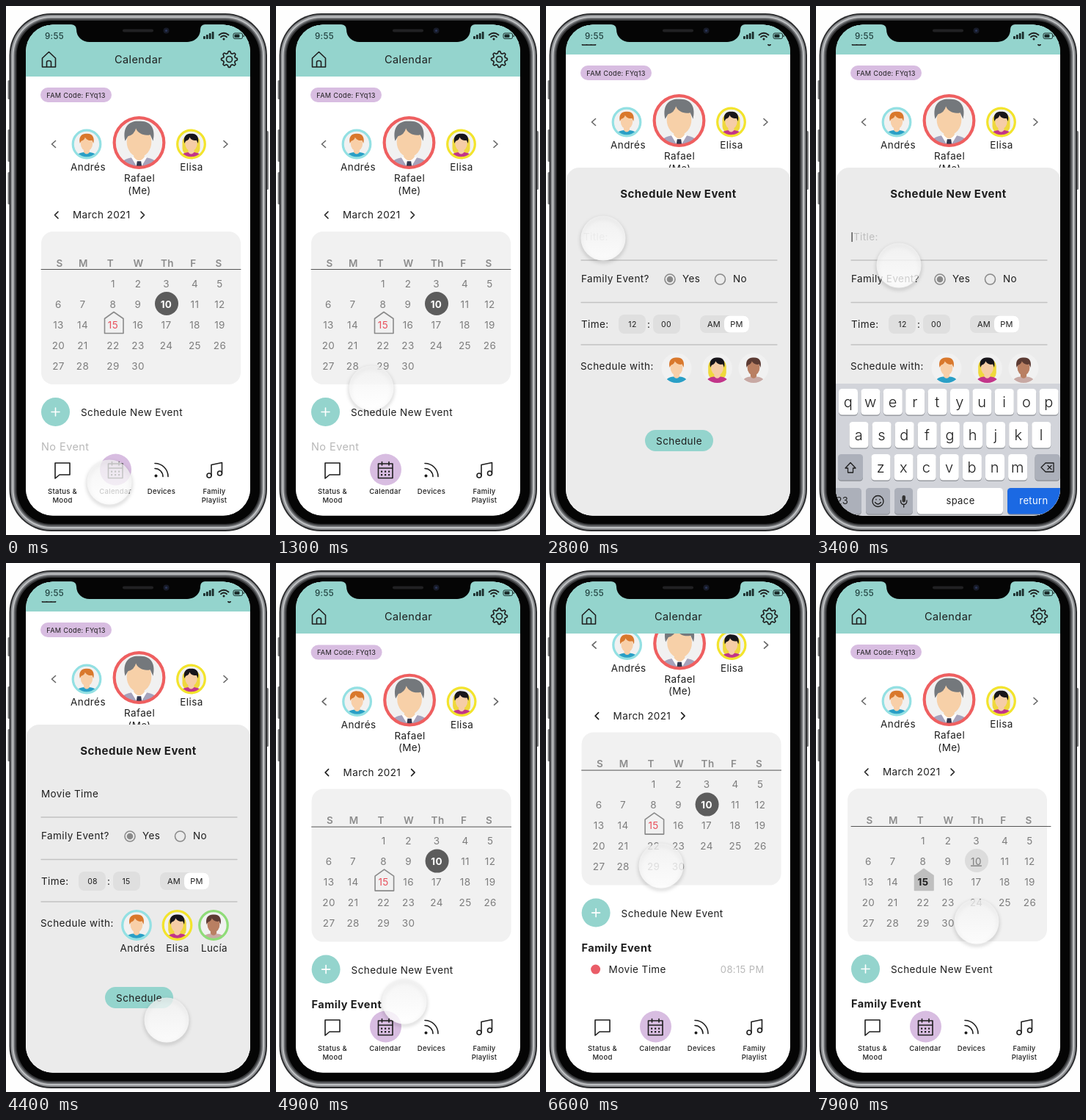
An HTML page for the animation above (8000 ms loop, 360 by 720 pixels).

```html
<!DOCTYPE html>
<html lang="en">
<head>
<meta charset="utf-8">
<title>Family calendar</title>
<style>
html, body { margin: 0; width: 100%; height: 100%; overflow: hidden; background: #fefefe; }
svg { display: block; width: 360px; height: 720px; }
text { font-family: Inter, "Open Sans", sans-serif; letter-spacing: .03em; fill: #1e1e1e; white-space: pre; }
.line { fill: none; stroke: #1e1e1e; stroke-width: 1.6; stroke-linecap: round; stroke-linejoin: round; }
</style>
</head>
<body>
<svg id="stage" viewBox="0 0 360 720"></svg>
<script>
const TEAL = '#94d4cd', PURPLE = '#d8bde1', GREY = '#7d7d7d';
const LOOP = 8000, STEP = 100;

// ---------- drawing helpers ----------
const text = (x, y, s, size = 13.5, o = {}) =>
  `<text x="${x}" y="${y}" font-size="${size}" text-anchor="${o.at || 'start'}" font-weight="${o.w || 400}"` +
  ` style="fill:${o.c || '#1e1e1e'}" ${o.x || ''}>${s}</text>`;
const mid = (x, y, s, size, o = {}) => text(x, y, s, size, { ...o, at: 'middle' });
const box = (x, y, w, h, r, fill, extra = '') =>
  `<rect x="${x}" y="${y}" width="${w}" height="${h}" rx="${r}" fill="${fill}" ${extra}/>`;
const disc = (x, y, r, fill, extra = '') => `<circle cx="${x}" cy="${y}" r="${r}" fill="${fill}" ${extra}/>`;
const line = (d, extra = '') => `<path class="line" d="${d}" ${extra}/>`;
const group = (id, body) => `<g id="${id}">${body}</g>`;

// ---------- people ----------
const people = {
  boy: { name: 'Andrés', ring: '#93e0e3', skin: '#f8cfa8', hair: '#d9782c', top: '#2a9fc6' },
  man: { name: 'Rafael', ring: '#ef5f60', skin: '#f7d0a8', hair: '#74787c', top: '#a5a2bb', suit: true, head: 1.2 },
  girl: { name: 'Elisa', ring: '#f3e42c', skin: '#f6cda6', hair: '#17151a', top: '#c2358a', long: '#efd83c' },
  mum: { name: 'Lucía', ring: '#8fdc78', skin: '#b97f62', hair: '#5c3b33', top: '#c8a9a4' }
};

function avatar(x, y, r, key, ringAttr = '') {
  const p = people[key];
  return `<g transform="translate(${x} ${y}) scale(${r / 20})">${disc(0, 0, 20, '#f1f1f1')}
    <g clip-path="url(#round)">
      ${p.long ? box(-12, -12, 24, 27, 9, p.long) : ''}
      <path d="M-15 21C-15 12-7 11 0 11S15 12 15 21Z" fill="${p.top}"/>
      ${p.suit ? '<path d="M-6 11L0 21L6 11Z" fill="#fff"/><path d="M-1.5 14h3l1 7h-5z" fill="#33384f"/>' : ''}
      <path d="M-4 4h8v7q-4 5-8 0z" fill="${p.skin}"/>
      <g transform="scale(${p.head || 1.05})">
        <ellipse cy="-.5" rx="7.8" ry="9.5" fill="${p.skin}"/>
        <path d="M-8.8-1C-11-11-5-14 0-13.500C8-14 10.500-8 8.800-1L7-5C3-4-1-6-2-9Q-3-5-7-4Z" fill="${p.hair}"/>
      </g>
    </g>
    <circle r="18.8" fill="none" stroke="${p.ring}" stroke-width="${r > 30 ? 2.3 : 3.2}" ${ringAttr}/></g>`;
}

// ---------- calendar page ----------
const colX = [71.5, 104.5, 146, 180, 218.5, 257.5, 291.5];
const heads = [['S', 73], ['M', 105.5], ['T', 142.5], ['W', 180.5], ['Th', 220], ['F', 255.5], ['S', 290]];

function days() {
  let s = '';
  for (let d = 1; d <= 30; d++) {
    const x = colX[(d + 1) % 7], y = 382.5 + 28 * Math.floor((d + 1) / 7);
    s += mid(x, y, d, 13.5, { c: GREY, x: `id="d${d}"` });
  }
  return s;
}

function content() {
  return box(47, 111, 97, 20, 10, PURPLE) + mid(95.5, 124.5, 'FAM Code: FYq13', 9.2) +
    line('M67.5 183.5l-5 4.5 5 4.5M297 183.5l5 4.5-5 4.5', 'style="stroke:#666"') +
    avatar(110, 188, 20, 'boy') + avatar(181.5, 186, 36, 'man') + avatar(252.5, 188, 20, 'girl') +
    mid(112, 224, people.boy.name) + mid(182, 239, people.man.name) + mid(182, 255.5, '(Me)') +
    mid(253, 224, people.girl.name) +
    line('M71 280l-4.5 4.5 4.5 4.5M184 280l4.5 4.5-4.5 4.5') + text(91, 289, 'March 2021') +
    box(48, 307, 272, 208, 16, '#f1f1f1', 'id="card"') +
    heads.map(([s, x]) => mid(x, 354.5, s, 13.5, { w: 600, c: '#8c8c8c' })).join('') +
    line('M48 358.5H320', 'style="stroke:#555;stroke-width:1"') +
    disc(219, 405, 16, '#5c5c5c', 'id="today"') +
    line('M147 416.500L160 425.500V445.500H134.500V425.500Z', 'id="house"') + days() +
    disc(67.5, 552.5, 19.5, TEAL) + line('M62 552.5h11M67.5 547v11', 'style="stroke:#fff"') +
    text(102, 558, 'Schedule New Event') +
    group('none', text(48, 605, 'No Event', 14.5, { c: '#b8b8b8' })) +
    group('events', text(48, 605, 'Family Event', 14.5, { w: 700 }) + disc(67, 629.5, 6.5, '#ea5d68') +
      text(85, 634, 'Movie Time') + text(297, 634, '08:15 PM', 13, { at: 'end', c: '#b8b8b8' }));
}

function gear(cx, cy) {
  const pts = [];
  for (let i = 0; i < 32; i++) {
    const a = (i - 0.5) * Math.PI / 16, r = i % 4 < 2 ? 11 : 8.3;
    pts.push((cx + r * Math.cos(a)).toFixed(1) + ' ' + (cy + r * Math.sin(a)).toFixed(1));
  }
  return line('M' + pts.join('L') + 'Z') + disc(cx, cy, 4, 'none', 'class="line"');
}

const header = () => box(27, 0, 306, 96, 0, TEAL) + mid(180.5, 78, 'Calendar', 14.5) +
  line('M49.5 71L58.5 62.5L67.5 71V83H49.5ZM55.5 83V76.5q0-2 3-2t3 2V83') + gear(304.5, 72.5);

const statusBar = () => box(27, 20, 306, 32, 0, TEAL) + text(53, 44.5, '9:55', 11.5, { w: 500, c: '#21413f' }) +
  [4, 6, 8, 10].map((h, i) => box(269 + i * 3.9, 45 - h, 2.8, h, 0.8, '#1a2c2b')).join('') +
  line('M290.5 39.5q6.5-5.5 13 0M293 42.2q4-3.3 8 0', 'style="stroke-width:1.9"') + disc(297, 45, 1.5, '#1e1e1e') +
  box(310, 37, 12.5, 7.5, 2, 'none', 'stroke="#1a2c2b"') + box(311.5, 38.5, 7, 4.5, 1, '#1a2c2b') +
  box(323.5, 39.5, 1.3, 2.5, 0.6, '#1a2c2b');

const label = (x, ...rows) => rows.map((s, i) => mid(x, 663.5 + i * 12.5, s, 9.5, { w: 500 })).join('');

const nav = () => box(27, 609, 306, 90, 0, '#fff') + disc(149.5, 631, 21.5, PURPLE) +
  line('M67 622H87V638H73L67 643Z') +
  line('M139.5 623h19.5v19.5h-19.5zM139.5 629h19.5M144.5 620.5v4.5M154 620.5v4.5') +
  [0, 1, 2, 3, 4, 5].map(i => box(143 + i % 3 * 5, 632.5 + (i > 2) * 4.5, 2.2, 2.2, 0.5, '#1e1e1e')).join('') +
  line('M203 622.5a18 18 0 0 1 18 18M203 629.5a11 11 0 0 1 11 11') + disc(204.5, 639.5, 2, '#1e1e1e') +
  line('M280 639V624.5L294.5 621.5V636') +
  disc(277, 639, 3, 'none', 'class="line"') + disc(291.5, 636, 3, 'none', 'class="line"') +
  label(77, 'Status &amp;', 'Mood') + label(149, 'Calendar') + label(212, 'Devices') + label(284, 'Family', 'Playlist');

// ---------- form ----------
const guests = [['boy', 178, 179.5], ['girl', 233.5, 234], ['mum', 283, 284]];

function form() {
  const radio = x => disc(x, 372, 7, 'none', 'stroke="#8a8a8a" stroke-width="1.6"');
  return box(27.5, 220, 306, 500, 18, '#ebebeb') + mid(180.5, 261, 'Schedule New Event', 15, { w: 700 }) +
    text(51, 319, 'Title:', 13.5, { c: '#bdbdbd', x: 'id="hint"' }) + text(48, 319, '', 13.5, { x: 'id="title"' }) +
    box(48.5, 308, 1.2, 13, 0, '#333', 'id="caret"') +
    line('M48 346H315M48 403.5H315M48 461H315', 'style="stroke:#c2c2c2;stroke-width:1.3"') +
    text(48, 376, 'Family Event?') + radio(169) + disc(169, 372, 4.3, '#8a8a8a') + text(186, 376, 'Yes') +
    radio(237.5) + text(255, 376, 'No') + text(48, 438, 'Time:') +
    box(99, 420, 37, 26, 8, '#dfdfdf') + mid(118, 437, '12', 10.5, { x: 'id="hour"' }) + text(138, 438, ':') +
    box(146, 420, 37, 26, 8, '#dfdfdf') + mid(164, 437, '00', 10.5, { x: 'id="minute"' }) +
    box(210, 421, 67, 24, 8, '#dfdfdf') + box(243, 421.5, 34, 23, 8, '#fff') +
    mid(229, 437, 'AM', 11) + mid(260, 437, 'PM', 11) + text(47, 495, 'Schedule with:') +
    guests.map(([k, x, nx], i) => avatar(x, 493, 20.5, k, `id="ring${i}"`) +
      mid(nx, 529, people[k].name, 13.5, { x: `id="guest${i}"` })).join('') +
    box(135, 577, 93, 29, 14.5, TEAL) + mid(181.5, 596.5, 'Schedule');
}

function keyboard() {
  const key = (x, y, w, fill = '#fff') => box(x, y + 1.2, w, 35.5, 4.5, '#8b8e94') + box(x, y, w, 35.5, 4.5, fill);
  const row = (s, x, y, pitch) => [...s].map((c, i) =>
    key(x + i * pitch - 13, y, 26) + mid(x + i * pitch, y + 25, c, 20, { w: 300 })).join('');
  const dark = '#acb0ba', thin = 'style="stroke-width:1.3"';
  return box(27, 514, 306, 190, 0, '#d2d4da') +
    row('qwertyuiop', 44, 521, 30.4) + row('asdfghjkl', 58.5, 566, 31.1) + row('zxcvbnm', 88.5, 610, 31.1) +
    key(30, 610, 34, dark) + key(298.5, 610, 34, dark) + key(20, 656, 42, dark) + key(68, 656, 33, dark) +
    key(107, 656, 25, dark) + key(138, 656, 117) + key(261, 656, 76, '#1b69e3') +
    line('M47 621.5l7 7.5h-3.5v6h-7v-6H40z', thin) +
    line('M313 622h11v12h-11l-6-6zM316 625.5l5 5M321 625.5l-5 5', thin) +
    mid(33, 678, '123', 13) + mid(197, 678, 'space', 13) + mid(297, 678, 'return', 13, { c: '#fff' }) +
    disc(84.5, 674, 7.5, 'none', 'class="line" ' + thin) +
    line('M82 671.5v.5M87 671.5v.5M80.5 675.5q4 5 8 0', thin) +
    box(117.5, 666, 4.5, 9.5, 2.2, '#333') +
    line('M115.5 673q0 5.5 4.2 5.5t4.2-5.5M119.7 678.5v3.5', thin);
}

// ---------- phone ----------
const shell = (inset, fill) => box(4.5 + inset, 10 + inset, 351.5 - 2 * inset, 705 - 2 * inset, 57 - inset, fill);
const body = () =>
  [[2.5, 101, 26], [2.5, 168, 44], [2.5, 226, 44], [354, 170, 80]].map(([x, y, h]) => box(x, y, 4, h, 1.5, '#77787a')).join('') +
  shell(0, '#2c2d2f') + shell(2, '#8e9093') + shell(4, '#bfc1c3') + shell(6, '#6d6f72') +
  shell(8, '#38393b') + shell(10, '#050505');

const notch = () => `<path d="M89 25h182q-6 1-6 7c0 10-8 17-18 17H114c-10 0-18-7-18-17q0-6-7-7z" fill="#050505"/>` +
  box(159, 31.5, 42, 4, 2, '#212123') + disc(218.5, 33.5, 4, '#171b28') + disc(218.5, 33.5, 1.6, '#2a3558');

document.getElementById('stage').innerHTML = `<defs>
  <clipPath id="round"><circle r="19.5"/></clipPath>
  <clipPath id="screen"><rect x="27" y="25.5" width="306" height="668" rx="37"/></clipPath>
  <filter id="soft" x="-40%" y="-40%" width="180%" height="180%"><feGaussianBlur stdDeviation="2.5"/></filter>
  <linearGradient id="glass" x2="0" y2="1"><stop stop-color="#f2f2f2" stop-opacity=".76"/>
    <stop offset="1" stop-color="#fff" stop-opacity=".8"/></linearGradient>
  </defs>` + body() +
  `<g clip-path="url(#screen)">` + box(27, 20, 306, 680, 0, '#fff') +
  group('page', content()) + group('head', header()) + nav() +
  group('form', form()) + group('keys', keyboard()) + statusBar() + `</g>` + notch() +
  group('touch', `<circle cy="2.5" r="29.5" fill="none" stroke="#000" stroke-opacity=".22" stroke-width="3" filter="url(#soft)"/>` +
    disc(0, 0, 30.5, 'url(#glass)'));

// ---------- motion ----------
const path = [
  [0, 141, 648], [300, 141, 648], [700, 145, 640], [900, 145, 636], [1300, 130, 520], [1500, 112, 487],
  [1800, 105, 457], [2100, 103, 456], [2300, 68, 522], [2500, 68, 522], [2800, 78, 316], [3000, 78, 316],
  [3400, 113, 353], [3800, 116, 420], [3900, 118, 433], [4000, 164, 433], [4100, 178, 493], [4200, 233, 493],
  [4300, 270, 515], [4400, 219, 622], [4500, 190, 597], [4900, 175, 597], [5300, 172, 590], [5600, 160, 490],
  [6100, 157, 413], [6600, 157, 412], [7000, 149, 362], [7200, 148, 358], [7500, 175, 410], [7900, 219, 488], [8000, 221, 492]
];
const ease = p => p * p * (3 - 2 * p);
const ramp = (t, a, b) => ease(Math.min(1, Math.max(0, (t - a) / (b - a))));
const el = {};
document.querySelectorAll('#stage [id]').forEach(n => el[n.id] = n);
const move = (n, x, y) => n.setAttribute('transform', `translate(${x} ${y})`);
const show = (n, on) => n.style.display = on ? '' : 'none';

function touchAt(t) {
  const i = path.findIndex(p => p[0] > t);
  const a = path[i - 1], b = path[i], p = ease((t - a[0]) / (b[0] - a[0]));
  return [a[1] + (b[1] - a[1]) * p, a[2] + (b[2] - a[2]) * p];
}

function render(t) {
  const saved = t >= 4600, picked = t >= 7200;
  const first = saved ? 0 : 30 * ramp(t, 1500, 1800);
  const second = picked ? 0 : 77 * ramp(t, 5600, 6100);
  const nudge = saved && !picked ? 0.6 : 0;
  move(el.page, nudge, nudge - first - second);
  move(el.head, 0, -first);
  show(el.none, !saved);
  show(el.events, saved);

  el.card.setAttribute('x', picked ? 43 : 48);
  el.today.setAttribute('fill', picked ? '#dcdcdc' : '#5c5c5c');
  Object.assign(el.d10.style, { fill: picked ? GREY : '#fff', fontWeight: picked ? 400 : 700, textDecoration: picked ? 'underline' : 'none' });
  Object.assign(el.d15.style, { fill: picked ? '#1e1e1e' : '#e9505c', fontWeight: picked ? 700 : 400 });
  Object.assign(el.house.style, { fill: picked ? '#bfbfbf' : 'none', stroke: picked ? '#bfbfbf' : '#8a8a8a' });

  const up = ramp(t, 2500, 2800) - ramp(t, 4400, 4700);
  const typing = ramp(t, 3000, 3300) - ramp(t, 3700, 3900);
  const typed = 'Movie Time'.slice(0, Math.max(0, Math.floor((t - 3400) / 35)));
  show(el.form, up > 0);
  move(el.form, 0, 480 * (1 - up));
  show(el.keys, typing > 0);
  move(el.keys, 0, 185 * (1 - typing));
  el.title.textContent = typed;
  show(el.hint, !typed);
  show(el.caret, t >= 3000 && !typed);
  el.hour.textContent = t >= 3900 ? '08' : '12';
  el.minute.textContent = t >= 4000 ? '15' : '00';
  guests.forEach((g, i) => {
    const on = t >= 4100 + i * 100;
    show(el['ring' + i], on);
    show(el['guest' + i], on);
  });
  move(el.touch, ...touchAt(t));
}

const start = performance.now();
function tick() {
  const t = (performance.now() - start) % LOOP;
  render(Math.floor(t / STEP) * STEP);
  requestAnimationFrame(tick);
}
tick();
</script>
</body>
</html>
```
